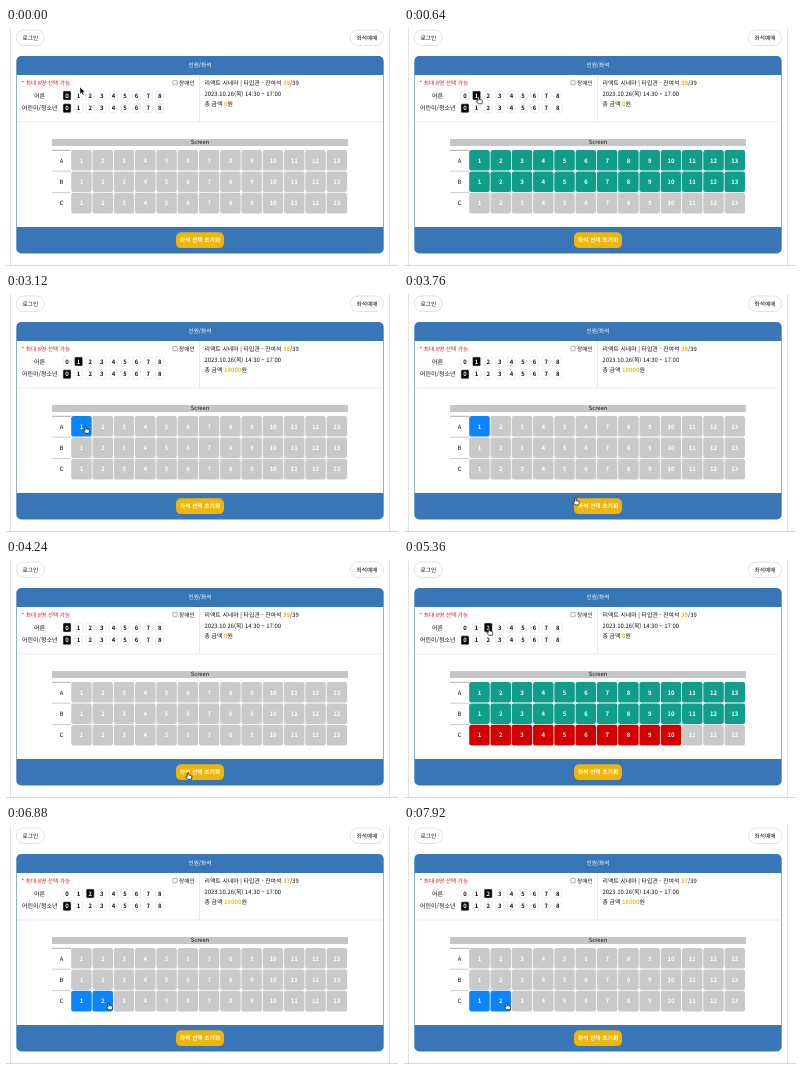
Animation, 392 px wide and 238 px high, one loop 8000 ms. Source, as an HTML page:

```html
<!DOCTYPE html>
<html lang="ko">
<head>
<meta charset="utf-8">
<title>좌석 선택</title>
<style>
  html, body { margin: 0; width: 100%; height: 100%; overflow: hidden; background: #fff; }
  svg { display: block; width: 100%; height: 100%; }
  text { font: 500 5.9px "Noto Sans CJK KR", "Noto Sans CJK", "Noto Sans", sans-serif; fill: #111; text-rendering: geometricPrecision; }
  .bold { font-weight: 700; }
  .mid { text-anchor: middle; }
  .white { fill: #fff; }
</style>
</head>
<body>
<svg id="stage" viewBox="0 0 392 238"></svg>
<script>
const stage = document.getElementById('stage');
const LOOP = 8000, STEP = 80;
const BLUE = '#3976b7', GRAY = '#c9c9c9', GREEN = '#119d8b', RED = '#d30000', PICKED = '#0a84ff', GOLD = '#efb508';
const COLS = 13, PITCH = 21.28, ROW_TOPS = [122, 143.4, 164.8];

function add(tag, attrs, parent = stage) {
  const el = document.createElementNS('http://www.w3.org/2000/svg', tag);
  for (const key in attrs) el.setAttribute(key, attrs[key]);
  parent.append(el);
  return el;
}
const box = (x, y, width, height, fill, rx = 0, more = {}) =>
  add('rect', { x, y, width, height, fill, rx, ...more });
const line = (x1, y1, x2, y2, stroke, width = 0.6) =>
  add('line', { x1, y1, x2, y2, stroke, 'stroke-width': width });
// y is the vertical centre of the text
function label(text, x, y, cls = '', size = 5.9, fill = '') {
  const el = add('text', { x, y: y + size * 0.36, class: cls, style: `font-size:${size}px;${fill && 'fill:' + fill}` });
  el.textContent = text;
  return el;
}
function span(parent, text, fill) {
  const el = add('tspan', fill ? { style: `fill:${fill};font-weight:700` } : {}, parent);
  el.textContent = text;
  return el;
}

// page frame and top buttons
line(4.5, 0, 4.5, 238, '#d0d0d0');
line(383.5, 0, 383.5, 238, '#d0d0d0');
line(0, 237.4, 392, 237.4, '#b8b8b8');
const pill = (x, width, text) => {
  box(x, 2, width, 15.5, '#fff', 7.7, { stroke: '#cfcfcf', 'stroke-width': 0.6 });
  label(text, x + width / 2, 9.8, 'mid', 5.7);
};
pill(10.3, 28, '로그인');
pill(344.3, 33.4, '좌석예매');

// panel
box(10.3, 28, 367.4, 197.5, BLUE, 5);
box(10.8, 47, 366.4, 152, '#fff');
label('인원/좌석', 194, 37.3, 'mid white', 5.7);
line(193.5, 47, 193.5, 94, '#d9d9d9');
line(11, 94, 377, 94, '#d9d9d9');

label('* 최대 8명 선택 가능', 15.5, 55, '', 5.7, '#d3202a');
box(166.8, 52.4, 4.4, 4.4, '#fff', 0.7, { stroke: '#777', 'stroke-width': 0.6 });
label('장애인', 173, 55, '', 5.7);

// head-count pickers
function picker(name, nameX, y) {
  label(name, nameX, y, '', 6);
  const cells = Array.from({ length: 9 }, (_, n) => {
    const x = 61 + n * 11.6;
    const back = box(x - 4, y - 4.5, 8, 9, '#fff', 1.2, { stroke: '#dcdcdc', 'stroke-width': 0.5 });
    return { back, text: label(n, x, y, 'bold mid', 5.9) };
  });
  return count => cells.forEach(({ back, text }, n) => {
    back.setAttribute('fill', n === count ? '#000' : '#fff');
    text.style.fill = n === count ? '#fff' : '#111';
  });
}
const setAdults = picker('어른', 28, 67.5);
picker('어린이/청소년', 16, 80.3)(0);

// show details
const title = label('', 198.5, 55);
span(title, '리액트 시네마 | 타입관 - 잔여석 ');
const remaining = span(title, '39', GOLD);
span(title, '/39');
label('2023.10.26(목) 14:30 ~ 17:00', 198.5, 65.4);
const total = label('', 198.5, 75.5);
span(total, '총 금액 ');
const price = span(total, '0', '#e3c31c');
span(total, '원');

// hall
box(46, 111, 296, 7, '#c6c6c6');
label('Screen', 194, 114.4, 'mid', 5.8);
const seats = ROW_TOPS.map((top, row) => {
  label('ABC'[row], 55.5, top + 10.4, 'mid');
  return Array.from({ length: COLS }, (_, col) => {
    const x = 65.2 + col * PITCH;
    const seat = box(x, top, 20.5, 20.6, GRAY, 2.2);
    label(col + 1, x + 10.3, top + 10.5, 'bold mid white', 6);
    return seat;
  });
});
line(46, 122.3, 65, 122.3, '#777');
line(46, 143.2, 65, 143.2, '#aaa');
line(46, 164.6, 65, 164.6, '#aaa');

box(170, 204.3, 48, 15.8, GOLD, 5);
label('좌석 선택 초기화', 194, 212.3, 'bold mid white', 5.8);

// pointers, both with the hot spot at 0,0
const arrow = add('path', {
  d: 'M0 0V7.2L1.7 5.7L2.8 8L4 7.5L2.9 5.2H5.1Z', fill: '#000', stroke: '#fff', 'stroke-width': 0.5
});
const hand = add('path', {
  d: 'M-.7 .4Q0-.5 .7 .4V2.5L3.2 3Q4 3.2 3.9 4.2L3.4 6.8H-.3L-2.2 4.2Q-2.2 3.2-.7 4Z',
  fill: '#fff', stroke: '#111', 'stroke-width': 0.7
});

const states = [
  { at: 0, adults: 0, left: 39, cost: 0, color: () => GRAY },
  { at: 560, adults: 1, left: 39, cost: 0, color: row => row < 2 ? GREEN : GRAY },
  { at: 2400, adults: 1, left: 38, cost: 10000, color: (row, col) => row + col === 0 ? PICKED : GRAY },
  { at: 4000, adults: 0, left: 39, cost: 0, color: () => GRAY },
  { at: 5280, adults: 2, left: 39, cost: 0, color: (row, col) => row < 2 ? GREEN : col < 10 ? RED : GRAY },
  { at: 6640, adults: 2, left: 37, cost: 16000, color: (row, col) => row === 2 && col < 2 ? PICKED : GRAY }
];
// start, end, x, y
const moves = [
  [0, 0, 74, 59], [0, 240, 74.5, 69], [1040, 2000, 79.8, 132.5], [3120, 3920, 182, 212.5],
  [4320, 5200, 85, 68.5], [5440, 6000, 103.7, 163.5], [6080, 6320, 102.8, 177]
];

function pointerAt(t) {
  let [x, y] = moves[0].slice(2);
  for (const [start, end, nx, ny] of moves.slice(1)) {
    if (t <= start) break;
    const p = Math.min(1, (t - start) / (end - start));
    const ease = p * p * (3 - 2 * p);
    x += (nx - x) * ease;
    y += (ny - y) * ease;
  }
  return [x, y];
}
const inside = (x, y, left, top, right, bottom) => x >= left && x <= right && y >= top && y <= bottom;
const clickable = (x, y) =>
  inside(x, y, 57, 63, 158, 85) || inside(x, y, 65, 122, 342, 186) || inside(x, y, 170, 204, 218, 220);

function draw(now) {
  const t = Math.floor(now % LOOP / STEP) * STEP;
  const state = states.findLast(s => s.at <= t);
  setAdults(state.adults);
  remaining.textContent = state.left;
  price.textContent = state.cost;
  seats.forEach((cells, row) => cells.forEach((seat, col) => seat.setAttribute('fill', state.color(row, col))));

  const [x, y] = pointerAt(t);
  const overTarget = clickable(x, y);
  for (const [shape, shown] of [[arrow, !overTarget], [hand, overTarget]]) {
    shape.setAttribute('transform', `translate(${x} ${y})`);
    shape.style.display = shown ? '' : 'none';
  }
}

let origin;
function tick(now) {
  origin ??= now;
  draw(now - origin);
  requestAnimationFrame(tick);
}
draw(0);
requestAnimationFrame(tick);
</script>
</body>
</html>
```
